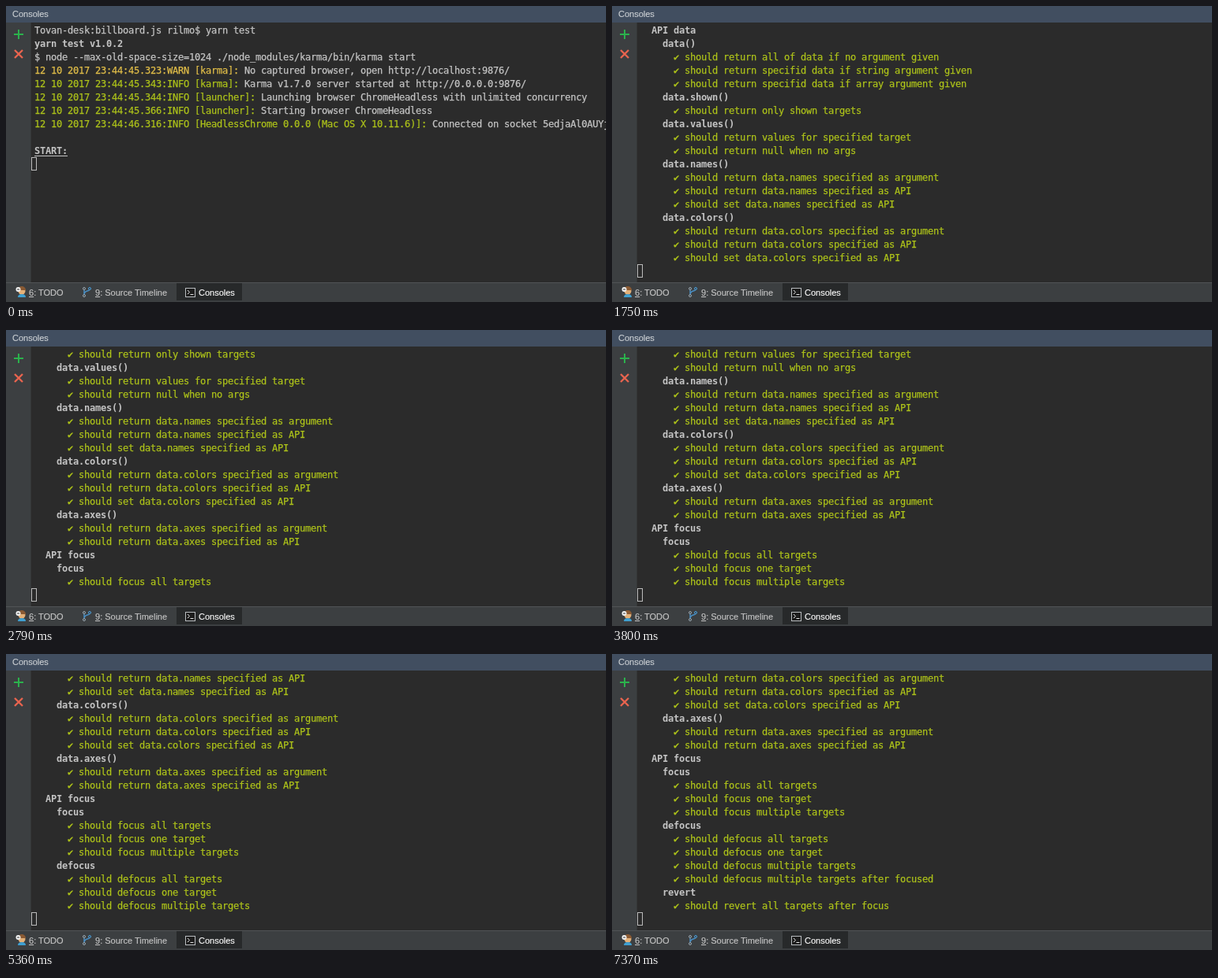
An HTML page for the animation above (8 s loop, 760x376 px).

```html
<!DOCTYPE html>
<html lang="en">
<head>
<meta charset="utf-8">
<title>Test run</title>
<style>
  html, body { margin: 0; width: 100%; height: 100%; overflow: hidden; background: #2b2b2b; }
  #stage {
    position: relative; width: 760px; height: 376px; overflow: hidden;
    background: #2b2b2b; color: #c4c4c4;
    font: 11px/14px "Liberation Sans", Arial, sans-serif;
    -webkit-text-stroke: .15px;
  }
  #stage > * { position: absolute; }
  .title {
    left: 0; top: 0; width: 752px; height: 21px; padding-left: 8px;
    line-height: 20px; color: #ccd0d4; background: #414e60;
  }
  .tools { left: 0; top: 21px; width: 31px; height: 330px; background: #3c3f41; border-right: 1px solid #353738; }
  .tabs { left: 0; top: 351px; width: 760px; height: 24px; background: #3c3f41; border-top: 1px solid #515456; }
  .active { left: 216px; top: 352px; width: 83px; height: 22px; background: #27292a; }
  .label { top: 356.5px; white-space: pre; }
  .icons { left: 0; top: 0; }

  .screen { left: 32px; top: 22px; width: 728px; height: 329px; overflow: hidden; }
  /* --n is the number of printed lines; eighteen fit above the cursor */
  .scroll {
    --n: 10;
    position: absolute; left: 0; width: 100%;
    top: min(0px, calc((18 - var(--n)) * 17px));
    animation: print 8s step-end infinite;
  }
  .log { height: calc(var(--n) * 17px); overflow: hidden; }
  .log pre {
    position: relative; top: 1px; margin: 0 0 0 4px;
    font: 12px/17px "DejaVu Sans Mono", monospace;
    letter-spacing: calc(7px - 1ch);
    -webkit-text-stroke: .25px;
  }
  .log b { -webkit-text-stroke: 0; }
  .cursor {
    position: absolute; left: 0; top: calc(var(--n) * 17px);
    box-sizing: border-box; width: 7px; height: 17px; border: 1px solid #bbb;
  }
  .start { text-decoration: underline 1px; text-underline-offset: 2px; }
  i { font-style: normal; color: #adc21a; }
  .warn { color: #e0bd48; }

  @keyframes print {
    0% { --n: 10; }
    6.25% { --n: 13; }
    12.625% { --n: 14; }
    12.875% { --n: 17; }
    14% { --n: 27; }
    14.75% { --n: 34; }
    21.875% { --n: 35; }
    22.625% { --n: 37; }
    28.5% { --n: 38; }
    34.875% { --n: 41; }
    41.25% { --n: 42; }
    47.5% { --n: 43; }
    54.25% { --n: 45; }
    60.625% { --n: 46; }
    67% { --n: 47; }
    79.375% { --n: 48; }
    92.125%, 100% { --n: 50; }
  }
</style>
</head>
<body>
<div id="stage">
  <div class="screen"><div class="scroll">
    <div class="log"><pre>Tovan-desk:billboard.js rilmo$ yarn test
<b>yarn test v1.0.2</b>
$ node --max-old-space-size=1024 ./node_modules/karma/bin/karma start
<i class="warn">12 10 2017 23:44:45.323:WARN [karma]: </i>No captured browser, open http://localhost:9876/
<i>12 10 2017 23:44:45.343:INFO [karma]: </i>Karma v1.7.0 server started at http://0.0.0.0:9876/
<i>12 10 2017 23:44:45.344:INFO [launcher]: </i>Launching browser ChromeHeadless with unlimited concurrency
<i>12 10 2017 23:44:45.366:INFO [launcher]: </i>Starting browser ChromeHeadless
<i>12 10 2017 23:44:46.316:INFO [HeadlessChrome 0.0.0 (Mac OS X 10.11.6)]: </i>Connected on socket 5edjaAl0AUYj

<b class="start">START:</b>
<b>  API axis
    axis.labels</b>
<i>      ✔ should update y axis label
      ✔ should update y axis label</i>
<b>  API chart
    resize</b>
<i>      ✔ should resize correctly</i>
<b>  API data
    data()</b>
<i>      ✔ should return all of data if no argument given
      ✔ should return specifid data if string argument given
      ✔ should return specifid data if array argument given</i>
<b>    data.shown()</b>
<i>      ✔ should return only shown targets</i>
<b>    data.values()</b>
<i>      ✔ should return values for specified target
      ✔ should return null when no args</i>
<b>    data.names()</b>
<i>      ✔ should return data.names specified as argument
      ✔ should return data.names specified as API
      ✔ should set data.names specified as API</i>
<b>    data.colors()</b>
<i>      ✔ should return data.colors specified as argument
      ✔ should return data.colors specified as API
      ✔ should set data.colors specified as API</i>
<b>    data.axes()</b>
<i>      ✔ should return data.axes specified as argument
      ✔ should return data.axes specified as API</i>
<b>  API focus
    focus</b>
<i>      ✔ should focus all targets
      ✔ should focus one target
      ✔ should focus multiple targets</i>
<b>    defocus</b>
<i>      ✔ should defocus all targets
      ✔ should defocus one target
      ✔ should defocus multiple targets
      ✔ should defocus multiple targets after focused</i>
<b>    revert</b>
<i>      ✔ should revert all targets after focus</i></pre></div>
    <div class="cursor"></div>
  </div></div>

  <div class="title">Consoles</div>
  <div class="tools"></div>
  <div class="tabs"></div>
  <div class="active"></div>
  <span class="label" style="left:29px"><u>6</u>: TODO</span>
  <span class="label" style="left:113px"><u>9</u>: Source Timeline</span>
  <span class="label" style="left:244px;color:#fff">Consoles</span>

  <svg class="icons" width="760" height="376" fill="none">
    <path d="M10 36h12M16 30v12" stroke="#2bb24c" stroke-width="2"/>
    <path d="M11 56l10 10M21 56l-10 10" stroke="#e8644f" stroke-width="2.4"/>
    <!-- to-do figure -->
    <circle cx="20" cy="362" r="4.5" fill="#e3b078"/>
    <path d="M15 361a5 5 0 0 1 10 0z" fill="#8a5a33"/>
    <path d="M15 370q0-4 5-4t5 4z" fill="#3f9fd0"/>
    <circle cx="15.5" cy="360" r="3" fill="#f2f2f2"/>
    <path d="M14 360h3" stroke="#333"/>
    <!-- branch -->
    <path d="M99 360v7M99 367q0-4 4-5t3-4" stroke="#4a8fc4" stroke-width="1.4"/>
    <g fill="#3c3f41" stroke="#9aa7b0">
      <circle cx="99" cy="359" r="1.5"/>
      <circle cx="106" cy="359" r="1.5" stroke="#4a9fdc"/>
      <circle cx="99" cy="368" r="1.5"/>
    </g>
    <!-- prompt -->
    <rect x="227.5" y="358.5" width="12" height="11" fill="#1d1d1d" stroke="#b8bcbf"/>
    <path d="M230 361l2.5 2.500-2.5 2.500M233.5 366.5h4" stroke="#e4e4e4"/>
  </svg>
</div>
</body>
</html>
```
